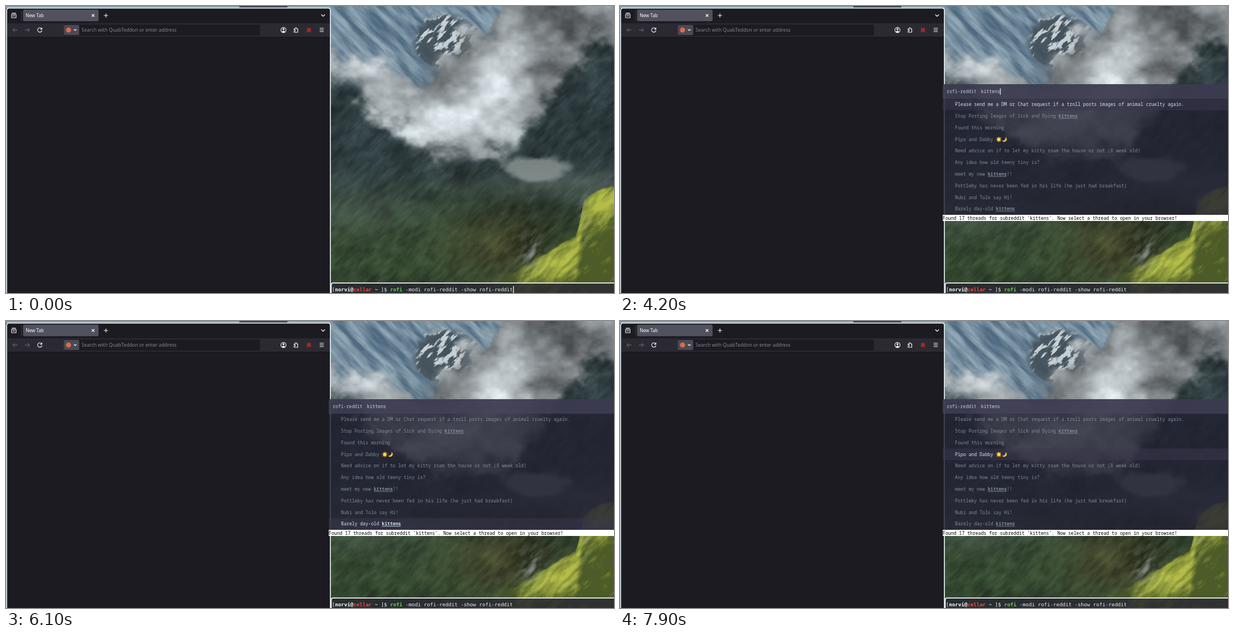
Animation of 1089x514 px, one loop 8000 ms. Source, as an HTML page with a canvas:

```html
<!DOCTYPE html>
<html lang="en">
<head>
<meta charset="utf-8">
<title>Launcher demo</title>
<style>
  html, body { margin: 0; width: 100%; height: 100%; overflow: hidden; background: #1c1b22; }
  canvas, svg { position: absolute; left: 0; top: 0; width: 100%; height: 100%; display: block; }
  text { white-space: pre; }
  .ui { font-family: "Noto Sans", "Open Sans", sans-serif; }
  .mono { font: 8.155px "Noto Sans Mono", "DejaVu Sans Mono", monospace; }
  .term { font: 9.14px "DejaVu Sans Mono", "Noto Sans Mono", monospace; }
  .b { font-weight: 700; }
  .hit { font-weight: 700; text-decoration: underline; }
  .line { fill: none; stroke: #fbfbfe; stroke-width: 1.1; stroke-linecap: round; stroke-linejoin: round; }
</style>
</head>
<body>
<canvas id="wall" width="1089" height="514"></canvas>
<svg viewBox="0 0 1089 514" preserveAspectRatio="none">
  <!-- browser -->
  <path d="M1.200 515V8q0-4.300 4.300-4.300H576.700q4.300 0 4.300 4.300V515" fill="#1c1b22" stroke="#e4f0f1" stroke-width="1.700"/>
  <rect x="2.200" y="31" width="577.800" height="24.500" fill="#2b2a33"/>
  <path d="M2.200 55.700H580" stroke="#15141a" stroke-width=".8"/>
  <path d="M27.700 8V27" stroke="#45444f" stroke-width=".8"/>
  <rect x="30.500" y="6.500" width="135.300" height="20.800" rx="2.500" fill="#52515e"/>
  <text class="ui" x="35.300" y="20" font-size="8.100" fill="#fbfbfe">New Tab</text>
  <g class="line">
    <path d="M10 15H18V21H10zM10.800 12.900H17.200M12.500 17.600H15.500"/>
    <path d="M154 15l4 4M158 15l-4 4M175.700 17h6.600M179 13.700v6.600M565 15.500l3 3l3-3"/>
    <path d="M64 41A3.900 3.900 0 1 0 64.300 44.200M64.300 39V41.600H61.700"/>
    <path d="M562.200 39.800h6.600m-6.600 3h6.600m-6.600 3h6.600" stroke-width="1"/>
    <path d="M516 41h2v-1a1.300 1.300 0 0 1 2.600 0v1h2v6H516v-2h1a1.200 1.200 0 0 0 0-2.400H516z"/>
    <circle cx="497" cy="43" r="4.600"/>
    <path d="M20 43h-7.500m3.200-3.300l-3.300 3.300l3.300 3.300M34.500 43H42m-3.200-3.300l3.300 3.300l-3.300 3.300" stroke="#74737d" stroke-width="1"/>
  </g>
  <circle cx="497" cy="41.500" r="1.700" fill="#fbfbfe"/>
  <path d="M494 45.900q3-3.400 6 0q-3 2.300-6 0z" fill="#fbfbfe"/>
  <rect x="539" y="39.500" width="7.200" height="7.200" fill="#9e2a24"/>
  <rect x="103.500" y="33.300" width="351.300" height="19.700" rx="2.500" fill="#1c1b22"/>
  <rect x="103.500" y="34" width="27.700" height="18" rx="2" fill="#4a4954"/>
  <circle cx="112" cy="43" r="4.600" fill="#dd6a48"/>
  <path class="line" d="M122 42l2 2l2-2"/>
  <text class="ui" x="135.200" y="46.200" font-size="8.600" fill="#85848d">Search with QuabTeddon or enter address</text>
  <!-- terminal -->
  <path d="M582.500 516V499.500q0-3.300 3.300-3.300H1092V516z" fill="#272733" fill-opacity=".78" stroke="#f2f5f1" stroke-width="1.700"/>
  <text class="term" x="583.700" y="511" fill="#ececec">[<tspan class="b" fill="#fff">norvi@</tspan><tspan class="b" fill="#f3493f">cellar</tspan> ~ ]$ <tspan class="b" fill="#66d34a">rofi</tspan> -modi rofi-reddit -show rofi-reddit</text>
  <rect id="termCursor" x="908.300" y="501.500" width="1.300" height="13" fill="#fff"/>
  <!-- launcher -->
  <g id="launcher">
    <rect x="578" y="166" width="511" height="208" fill="#212131" fill-opacity=".82"/>
    <path d="M578 166V143q0-3 3-3H1089V166z" fill="#3c3b50" fill-opacity=".94"/>
    <rect id="bar" x="578" width="511" height="20.800" fill="#3a394e" fill-opacity=".5"/>
    <text class="mono" x="585" y="156" fill="#b6cbd9">rofi-reddit</text>
    <text class="mono" id="query" x="646.500" y="156" fill="#c3d7e6"></text>
    <rect id="caret" y="147.500" width="1.200" height="11.300" fill="#f4f7fb"/>
    <g id="rows" class="mono"></g>
    <g id="icons" transform="translate(678.500 239)">
      <path d="M0-5V5M-5 0H5M-3.500-3.500l7 7m0-7l-7 7" stroke="#f5ad28" stroke-width="1.100"/>
      <circle r="2.900" fill="#ffd94a"/>
      <path d="M12-4.600A4.700 4.700 0 1 1 5.800 2.200A5.400 5.400 0 0 0 12-4.600z" fill="#f6c744"/>
    </g>
    <rect x="578" y="374" width="511" height="11" fill="#fff"/>
    <text class="mono" id="message" x="578" y="382.500" fill="#000" font-weight="500"></text>
  </g>
</svg>
<script>
const $ = id => document.getElementById(id);
const LOOP = 8000, STEP = 100, OPEN = 600, FOUND = 4200, BLINK = 1200;
const ROW = 20.8, CHAR = 4.893, PAGE = 10;

const threads = [
  "Please send me a DM or Chat request if a troll posts images of animal cruelty again.",
  "Stop Posting Images of Sick and Dying Kittens",
  "Found this morning",
  "Pipo and Dabby ",
  "Need advice on if to let my kitty roam the house or not (8 week old)",
  "Any idea how old teeny tiny is?",
  "meet my new kittens!!",
  "Pottleby has never been fed in his life (he just had breakfast)",
  "Nubi and Tolo say Hi!",
  "Barely day-old kittens",
  "Anyone know how to get a kitten to trust you? I've had her sense like maybe around February and ever",
  "Morning Yawn!",
  "Help with newborn",
  "Slow introductions for kitty and puppies",
  "Freaking out",
  "Adopting a 2nd kitten - advice needed.",
  "Tibbet posting!! 7 weeks now and we free roam the upstairs!"
];

// Bursts of key presses
const burst = (at, keys, every = STEP) => ({ at, keys, every });
const typing = [burst(1800, 1), burst(2000, 1), burst(2300, 5)];
const up = [burst(4900, 1), burst(5300, 3), burst(5700, 3), burst(6100, 1), burst(6400, 5), burst(7000, 1), burst(7700, 3)];
const down = [burst(7400, 3, STEP / 2)];
const pressed = (bursts, t) => bursts.reduce((sum, { at, keys, every }) =>
  sum + (t < at ? 0 : Math.min(keys, 1 + Math.floor((t - at) / every))), 0);

const rows = threads.map((title, i) => {
  const el = document.createElementNS("http://www.w3.org/2000/svg", "text");
  el.setAttribute("x", 600);
  el.setAttribute("y", 179.2 + (i % PAGE) * ROW);
  el.innerHTML = title.replace(/kittens/i, '<tspan class="hit">$&</tspan>');
  $("rows").append(el);
  return el;
});

function show(el, on) { el.setAttribute("visibility", on ? "inherit" : "hidden"); }

function update(time) {
  const t = Math.floor(time / STEP) * STEP;
  const open = t >= OPEN, found = t >= FOUND;
  show($("termCursor"), !open);
  show($("launcher"), open);

  const typed = pressed(typing, t);
  $("query").textContent = "kittens".slice(0, typed);
  $("caret").setAttribute("x", 646.4 + typed * CHAR);
  show($("caret"), !found || Math.floor((t - FOUND) / BLINK) % 2 === 0);

  const count = threads.length;
  const selected = (count + pressed(down, t) - pressed(up, t)) % count;
  const page = Math.floor(selected / PAGE);
  rows.forEach((el, i) => {
    show(el, found && Math.floor(i / PAGE) === page);
    el.setAttribute("fill", i === selected ? "#d3e5ef" : "#7f8b9a");
  });
  show($("icons"), found && page === 0);
  show($("bar"), found);
  $("bar").setAttribute("y", 166 + (selected % PAGE) * ROW);
  $("message").textContent = found
    ? `Found ${count} threads for subreddit 'kittens'. Now select a thread to open in your browser!`
    : "Type a subreddit to fetch threads for!";
}

// Wallpaper: a misty valley shaded per pixel from noise
let seed = 11;
const rand = () => (seed = (seed * 1664525 + 1013904223) % 4294967296) / 4294967296;
const lattice = Float32Array.from({ length: 4096 }, () => rand() * 2 - 1);
const at = (i, j) => lattice[(i & 63) + (j & 63) * 64];
const clamp = v => Math.max(0, Math.min(1, v));
const ease = v => v * v * (3 - 2 * v);
const step = (a, b, v) => ease(clamp((v - a) / (b - a)));
const lerp = (a, b, k) => a + (b - a) * k;
const mix = (a, b, k) => a.map((v, i) => lerp(v, b[i], k));
const rgb = hex => [1, 3, 5].map(i => parseInt(hex.slice(i, i + 2), 16));
const bump = (x, y, cx, cy, rx, ry) => Math.exp(-(((x - cx) / rx) ** 2) - ((y - cy) / ry) ** 2);

function noise(x, y) {
  const i = Math.floor(x), j = Math.floor(y), u = ease(x - i), v = ease(y - j);
  return lerp(lerp(at(i, j), at(i + 1, j), u), lerp(at(i, j + 1), at(i + 1, j + 1), u), v);
}
function fbm(x, y) {
  let sum = 0;
  for (let k = 1; k <= 8; k *= 2) sum += noise(x * k + k * 7, y * k) / k;
  return sum / 1.9;
}

const slate = rgb("#506a80"), ice = rgb("#91a7b5"), rock = rgb("#424f58"), snow = rgb("#dde6e9");
const shade = rgb("#2d3a3d"), moss = rgb("#33462f"), earth = rgb("#423f26"), mist = rgb("#87918f");
const olive = rgb("#4c5b27"), lime = rgb("#b4bd48");

function valley(x, y) {
  const puff = fbm(x / 48, y / 38), streak = fbm((x + y) / 70, (x - y) / 14);
  const brush = fbm((x - y) / 26, (x + y) / 9);

  let color = mix(slate, ice, clamp(.5 + streak * 1.1));
  const crag = step(.35, .6, bump(x, y, 785, 65, 62, 55) + streak * .2);
  color = mix(color, rock, crag * .9);
  color = mix(color, snow, crag * step(.1, .3, brush) * .85);

  // the cloud bank fills the space between two sloping edges
  const top = Math.min(95 + (x - 582) * .3, 135 - (x - 740) * .95);
  const side = Math.abs(x - 840) / (x < 840 ? 250 : 175);
  const bottom = Math.max(75, 282 - 165 * side ** 1.5);

  let ground = mix(shade, moss, step(260, 430, y));
  ground = mix(ground, earth, bump(x, y, 890, 430, 100, 65) * .7);
  ground = ground.map(v => v * (1 + puff * .35 + brush * .3));
  color = mix(color, ground, step(0, 45, y - top + puff * 30));

  const cover = step(-18, 18, y - top + puff * 55) * step(-24, 30, bottom - y + puff * 60);
  const light = Math.min(250, 128 + 110 * bump(x, y, 795, 203, 110, 45) + 70 * bump(x, y, 880, 115, 55, 100)
    + 50 * bump(x, y, 620, 115, 70, 35) + 85 * puff);
  color = mix(color, [light * .96, light, light * 1.02], cover * .95);

  color = mix(color, mist, .85 * step(.3, .75, bump(x, y, 950, 290, 65, 26) + puff * .5));
  color = mix(color, mist, .3 * bump(x, y, 1000, 315, 150, 25) + .2 * bump(x, y, 640, 370, 90, 50));

  // sunlit hill, with a cliff on its left flank
  const depth = y - 500 + (x - 870) * .58 + 55 * step(1018, 1036, x) + puff * 14;
  const sun = Math.exp(-(((depth - 25) / 38) ** 2)) * step(870, 985, x);
  const hill = mix(olive, lime, clamp(sun + brush * .55 - .1));
  color = mix(color, hill, step(-3, 4, depth) * step(850, 950, x));
  const cliff = bump(x, y, 1036, 375, 9, 30) + bump(x, y, 940, 440, 20, 25) * .7;
  return mix(color, mist, clamp(cliff * (.5 + brush * 1.5)));
}

function paintWall() {
  const ctx = $("wall").getContext("2d"), left = 577, width = 1089 - left, height = 514;
  const image = ctx.createImageData(width, height);
  for (let y = 0, p = 0; y < height; y++)
    for (let x = 0; x < width; x++, p += 4)
      image.data.set([...valley(x + left, y), 255], p);
  ctx.putImageData(image, left, 0);

  // strip above the browser
  ctx.fillStyle = "#87a3ad";
  ctx.fillRect(0, 0, 581, 4);
  ctx.fillStyle = "#394951";
  ctx.fillRect(418, 0, 86, 3);
}

paintWall();
const start = performance.now();
function tick() {
  update((performance.now() - start) % LOOP);
  requestAnimationFrame(tick);
}
tick();
</script>
</body>
</html>
```
